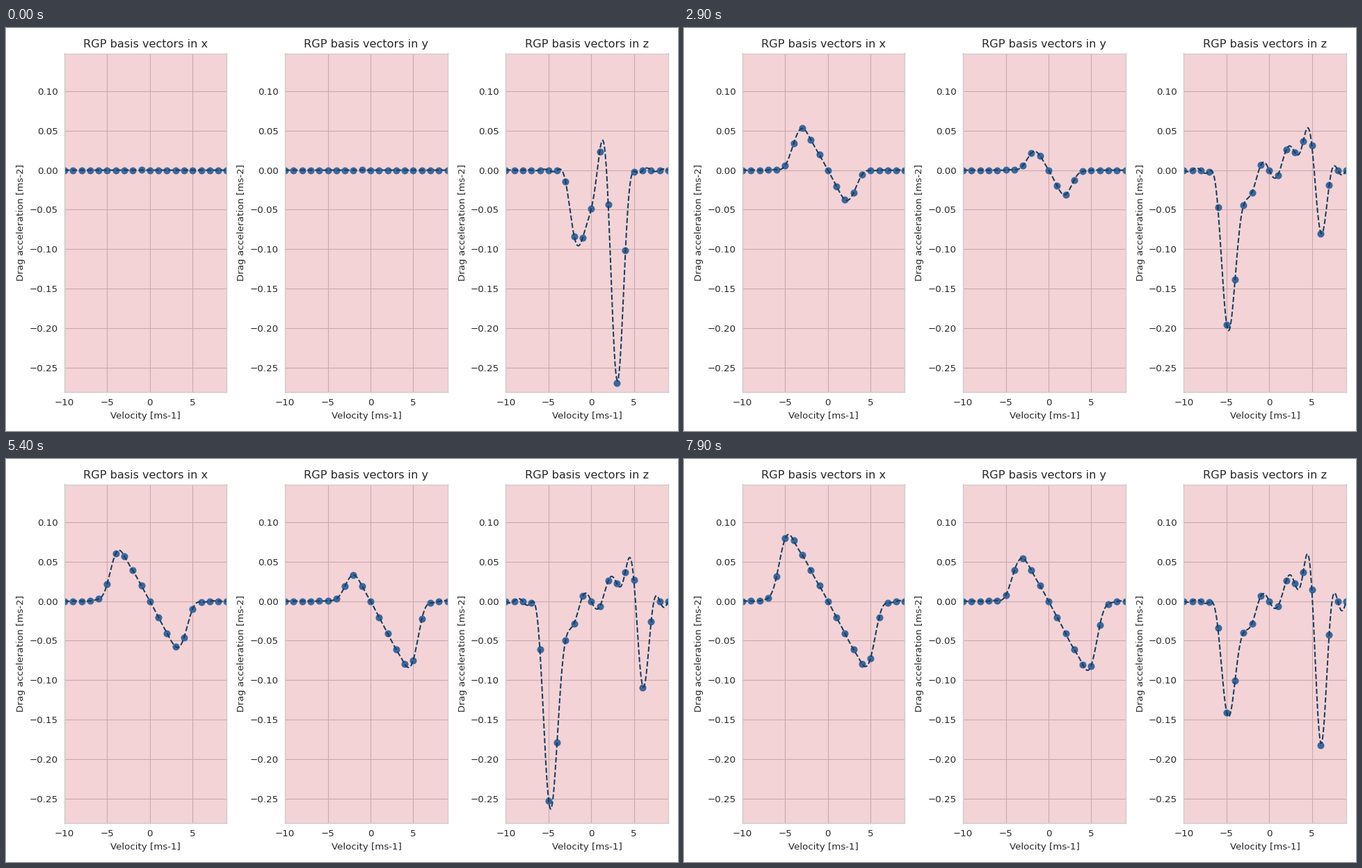
Recreate the animation shown at these times as a matplotlib script. Size 966x580 px, loop 8000 ms.

```python
import numpy as np
import matplotlib.pyplot as plt
from matplotlib.animation import FuncAnimation
from matplotlib.ticker import MultipleLocator

W, H, DPI = 966, 580, 96.6
FRAMES, STEP = 80, 100
PINK, GRID, EDGE, TEXT = "#f3d3d6", "#c9a8ad", "#cccccc", "#262626"
DOT, CURVE = "#3c679c", "#123f5f"

plt.rcParams.update({
    "font.family": "DejaVu Sans", "font.size": 10,
    "text.color": TEXT, "axes.labelcolor": TEXT,
    "xtick.color": TEXT, "ytick.color": TEXT,
    "axes.edgecolor": EDGE, "axes.linewidth": 1, "axes.axisbelow": True,
})

basis = np.arange(-10, 10)
grid = np.linspace(-10, 9, 200)


def kernel(a, b):
    return np.exp(-0.5 * (a[:, None] - b[None, :]) ** 2)


# Gaussian process mean as one linear map from basis values to the curve.
NOISE = 0.006
smooth = kernel(grid, basis) @ np.linalg.inv(
    kernel(basis, basis) + NOISE * np.eye(len(basis)))


def sigmoid(u):
    return 1 / (1 + np.exp(-u))


def bump(center, width):
    return np.exp(-0.5 * ((basis - center) / width) ** 2)


# Velocity range explored so far, at a few moments (s).
TIMES = [0, 1.2, 2.9, 4.7, 5.4, 6.8, 7.9]
X_RANGE = ([1, -3.7, -3.9, -4.3, -4.5, -5.5, -5.6],
           [-1, 0.4, 2.95, 4.05, 4.1, 5.35, 5.35])
Y_RANGE = ([1, -1.55, -2.1, -2.7, -2.7, -3.95, -4.0],
           [-1, 2.35, 2.45, 5.2, 5.4, 5.4, 5.55])


def linear_drag(t, span):
    """Drag opposing the velocity, learned only inside the explored range."""
    lo, hi = (np.interp(t, TIMES, edge) for edge in span)
    slope = np.where(basis < 0, -0.0195, -0.0205)
    return slope * basis * sigmoid((basis - lo) / 0.4) * sigmoid((hi - basis) / 0.4)


def vertical_drag(t):
    """Three overlapping phases of bumps and two dips that keep breathing."""
    early = np.interp(t, [0, 1.2], [1, 0])
    mid = np.interp(t, [0, 1.2, 2.9], [0, 1, 0])
    late = np.interp(t, [1.2, 2.9], [0, 1])
    dip_times = [1.2, 2.9, 4.7, 5.5, 6.8, 7.9]
    left = np.interp(t, dip_times, [0, 212, 234, 280, 211, 153])
    right = np.interp(t, dip_times, [0, 86, 132, 113, 217, 189])

    z = early * (-105 * bump(-1.5, 0.75) - 36 * bump(0, 0.4)
                 + 26 * bump(1, 0.4) - 278 * bump(3.15, 0.6))
    z += mid * (26 * bump(-5, 0.5) - 60 * bump(-2.5, 0.6) + 17 * bump(-1, 0.4)
                - 27 * bump(0, 0.4) + 9 * bump(1, 0.4) + 70 * bump(5.1, 1.05))
    z += late * (-40 * bump(-2.5, 0.6) + 8 * bump(-1, 0.4) - 9 * bump(1, 0.4)
                 + 33 * bump(2.4, 0.6) + 55 * bump(4.6, 0.65))
    z -= left * bump(-4.7, 0.75) + right * bump(6.05, 0.55)
    return z / 1000


def make_panel(fig, left, name):
    ax = fig.add_axes([left / W, 1 - 524 / H, 233.4 / W, 487.5 / H],
                      facecolor=PINK)
    ax.set(xlim=(-10, 9), ylim=(-0.281, 0.1478),
           xlabel="Velocity [ms-1]", ylabel="Drag acceleration [ms-2]")
    ax.set_title(f"RGP basis vectors in {name}", fontsize=12)
    ax.xaxis.set_major_locator(MultipleLocator(5))
    ax.yaxis.set_major_locator(MultipleLocator(0.05))
    ax.tick_params(left=False, bottom=False)
    ax.grid(color=GRID, linewidth=0.8)
    dots, = ax.plot([], [], "o", color=DOT, ms=6, mew=1.5, zorder=1.5)
    line, = ax.plot([], [], "--", color=CURVE, lw=1.5, zorder=2)
    return dots, line


fig = plt.figure(figsize=(W / DPI, H / DPI), dpi=DPI, facecolor="white")
panels = [
    (*make_panel(fig, 84 + 317.2 * i, name), drag)
    for i, (name, drag) in enumerate([
        ("x", lambda t: linear_drag(t, X_RANGE)),
        ("y", lambda t: linear_drag(t, Y_RANGE)),
        ("z", vertical_drag),
    ])
]


def update(i):
    t = i * STEP / 1000
    for dots, line, drag in panels:
        values = drag(t)
        dots.set_data(basis, values)
        line.set_data(grid, smooth @ values)
    return [artist for p in panels for artist in p[:2]]


anim = FuncAnimation(fig, update, frames=FRAMES, interval=STEP,
                     init_func=lambda: update(0), repeat=True, repeat_delay=0)
plt.show()
```
